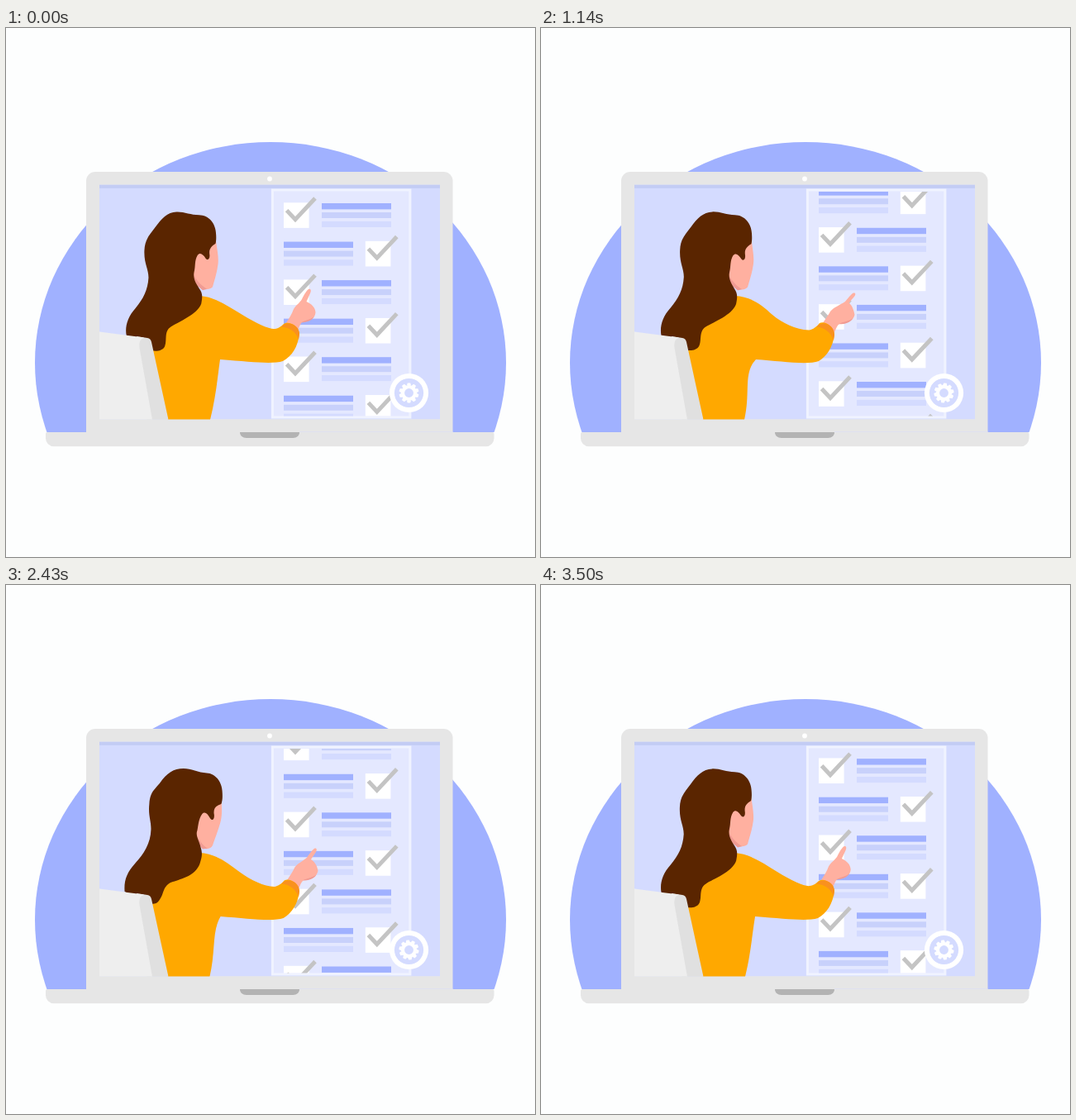
Recreate the animation shown at these times as an HTML page. Size 640 by 640 pixels, loop 3570 ms.

```html
<!DOCTYPE html>
<html lang="en">
<head>
<meta charset="utf-8">
<title>Online checklist</title>
<style>
  html, body { margin: 0; width: 100%; height: 100%; overflow: hidden; background: #fdfefe; }
  svg { display: block; width: 100%; height: 100%; }
</style>
</head>
<body>
<svg viewBox="0 0 640 640" xmlns="http://www.w3.org/2000/svg">
  <defs>
    <clipPath id="aboveBase"><rect width="640" height="489"/></clipPath>
    <clipPath id="screen"><rect x="113" y="189.5" width="412" height="284"/></clipPath>
    <clipPath id="page"><rect x="324" y="198" width="163" height="271.5"/></clipPath>
    <g id="bars">
      <rect width="84" height="7.4" fill="#a0b1ff"/>
      <rect y="11" width="84" height="7" fill="#c8d1fb"/>
      <rect y="21.8" width="84" height="7.2" fill="#d4dbff"/>
    </g>
    <g id="tick">
      <rect y="-.7" width="30.6" height="30.6" fill="#fff"/>
      <path d="M3.6 19.3 14.2 20.8 14.2 20.8" fill="none"/>
      <path d="M3.6 8.6 14 19.6 38-6" fill="none" stroke="#c4c4c4" stroke-width="5"/>
    </g>
    <g id="pair">
      <use href="#tick" x="336"/>
      <use href="#bars" x="382"/>
      <use href="#bars" x="336" y="46.55"/>
      <use href="#tick" x="434.8" y="46.55"/>
    </g>
  </defs>

  <ellipse cx="320" cy="405" rx="285" ry="267" fill="#a0b1ff" clip-path="url(#aboveBase)"/>
  <path d="M97 489V185a11 11 0 0 1 11-11H529.5a11 11 0 0 1 11 11V489Z" fill="#e6e6e6"/>
  <path d="M355 488.6H540.5" stroke="#dcdff4" stroke-width=".8"/>
  <path d="M50 489H588.5a2 2 0 0 1 2 2V496a10 10 0 0 1-10 10.3H58a10 10 0 0 1-10-10.3V491a2 2 0 0 1 2-2Z" fill="#e6e6e6"/>
  <path d="M283 489H355C355 493 352 496 347 496H291C286 496 283 493 283 489Z" fill="#b3b3b3"/>
  <circle cx="319" cy="182.5" r="2.9" fill="#fff"/>

  <g clip-path="url(#screen)">
    <rect x="113" y="189.5" width="412" height="284" fill="#d4dbff"/>
    <rect x="113" y="189.5" width="412" height="4.3" fill="#c3ccf4"/>
    <rect x="322.4" y="196" width="166.5" height="275" fill="#e4e8ff" stroke="#f0f3ff" stroke-width="3"/>
    <g clip-path="url(#page)"><g id="list"></g></g>

    <path id="face" fill="#ffb0a0"/>
    <path id="neck" fill="#f09b93"/>
    <path id="hand" fill="#ffb0a0"/>
    <path id="palm" fill="#f09b93"/>
    <path id="shirt" fill="#ffa800"/>
    <path id="cuff" fill="#f9911e"/>
    <path id="hair" fill="#5a2500"/>

    <path d="M158 373 171 375Q175 375.6 176 380L196.5 474H170Z" fill="#e0e0e0"/>
    <path d="M113 367.4 167 374.6Q160 377 161.5 387L177 474H113Z" fill="#eee"/>
  </g>

  <g transform="translate(487.5 441.5)">
    <circle r="23.6" fill="#fff"/>
    <circle r="17.6" fill="#d4dbff"/>
    <g id="gear" fill="#fff"><circle r="9.6"/></g>
    <circle r="5.4" fill="#d4dbff"/>
  </g>
</svg>

<script>
const LOOP = 3570, STEPS = 50, PAIR = 93.1, TEETH = 10;
const NS = 'http://www.w3.org/2000/svg';
const get = id => document.getElementById(id);

function add(parent, tag, attrs) {
  const el = document.createElementNS(NS, tag);
  for (const key in attrs) el.setAttribute(key, attrs[key]);
  parent.append(el);
}

for (let i = -1; i < 3; i++) add(get('list'), 'use', { href: '#pair', y: 212 + i * PAIR });
for (let i = 0; i < TEETH; i++) {
  add(get('gear'), 'path', {
    d: 'M-2.6-9-1.7-12H1.7L2.6-9Z',
    transform: `rotate(${i * 360 / TEETH})`
  });
}

// Each part has two end poses with the same path commands.
const headParts = {
  hair: [
    `M205 222.5C214 222 222 226 232 226C244 226 253 236 253 250C253.3 254 253 258 252.5 260
     C247 264 244.5 267 245.5 274C246 279 243 281.5 240.5 278C238 274 234 270.5 231 274.5
     C227 281 229 288 227 295C225.5 304 230 310 233 314C238 320 238 324 236.5 333
     C232 346 207 356 199 362C191 368 196 378 193 386C190 392 182 392 176 391L146 372
     C144 362 147 350 157 339C166 328 171 318 172 303C172 292 166 286 166.5 270
     C167 256 173 251 180 241C187 231 194 223 205 222.5Z`,
    `M215 222C224 222 233 227 243 227.5C254 228 262 239 262 252C262.3 257 262 262 260.5 265
     C254 267 250.5 271 252 278C252.5 284 249.5 286 247 282C244 277 241 273.5 237.5 277
     C233 283 233 290 231.5 297C229 303 234 310 235.5 317C238 325 237 329 234.5 337
     C229 352 213 355 202 359C189 363 191 375 186 380C183 385 180 386 174 385.5L143.5 371
     C142.5 358 146 348 156 337C167 325 175 312 175.5 296C176 286 172 279 173.5 265
     C174 252 179 248 186 240C195 227 203 222 215 222Z`
  ],
  face: [
    'M252 250C254 266 257 276 256 286C255 296 252 305 250 313C246 316.5 240 316 236 315L222 300L226 270Z',
    'M261 258C261 268 262 276 260 285C258 294 253 306 250 315C248 319.5 242 320 237 318.5L226 303L232 270Z'
  ],
  neck: [
    'M226 298C231 306 236 311 243 315.3L238 317L228 309Z',
    'M229 300C233 309 238 315 244 318.7L238 319.5L231 311Z'
  ]
};

const armParts = {
  shirt: [
    `M234 324C252 325 268 336 286 347C304 358 320 365 325 364C330 363.5 334 360 336 358
     C342 354 354 360 355 370C353 386 346 397 335 403C322 407 298 404 259 401
     C256 422 254 446 247 474L196 474L176 388L190 350Z`,
    `M234 324C254 325 266 334 280 347C292 357 308 365 324 365.5C329 365 334 361 337 357
     C343 354 354 360 355 371C353 386 346 397 336 403C322 408 290 403 260 401
     C244 418 254 440 246 474L196 474L176 388L190 350Z`
  ],
  cuff: [
    'M333 361.5C340 353 355 359 355 370L354 377C351 367 342 362 333 361.5Z',
    'M333.5 361.5C341 353 355 359 355 371L354 378C351 368 342 362 333.5 361.5Z'
  ],
  hand: [
    `M337 360C342 352 346 346 348 340C351 335 356 332 358 328C361 322 364 317 366 316
     C369 315 369.5 318 368 321L363.5 331C370 334 374 338 374.5 344C374 350 370 354 358 356
     C356 358 355 361 353 366Z`,
    `M339 360C344 352 348 347 350 343C354 338 362 335 368 331C372 326 376 321.5 378 320.5
     C381 320 381 322.5 379 325L372.5 332.5C377 336 378.5 342 379.5 347C378 354 370 358 361 358
     C358 360 357 364 355 368Z`
  ],
  palm: [
    'M357 356.5C363 352.5 369 353 373 349C370 354 364 356 357 356.5Z',
    'M360 358.3C367 354.5 373 355 377.5 351C374 357 367 358.5 360 358.3Z'
  ]
};

function blend([a, b], k) {
  const ends = b.match(/-?[\d.]+/g);
  let i = 0;
  return a.replace(/-?[\d.]+/g, n => (+n + (ends[i++] - n) * k).toFixed(2));
}

function pose(parts, k) {
  for (const id in parts) get(id).setAttribute('d', blend(parts[id], k));
}

const ease = u => (1 - Math.cos(Math.PI * u)) / 2;

// The head leans forward slowly and returns faster.
function lean(p) {
  const q = p < .1 ? p + 1 : p;
  if (q < .12) return 0;
  if (q < .74) return ease((q - .12) / .62);
  return 1 - ease(Math.min(1, (q - .74) / .34));
}

// The arm reaches out quickly and drifts back.
function reach(p) {
  return p < .34 ? 1 - (1 - p / .34) ** 2 : 1 - ((p - .34) / .66) ** 1.4;
}

function draw(ms) {
  const step = Math.floor((ms % LOOP) / LOOP * STEPS + .1) % STEPS;
  const p = step / STEPS;
  get('list').setAttribute('transform', `translate(0 ${p * PAIR})`);
  get('gear').setAttribute('transform', `rotate(${p * 360})`);
  pose(headParts, lean(p));
  pose(armParts, reach(p));
}

const start = performance.now();
function tick(now) {
  draw(Math.max(0, now - start));
  requestAnimationFrame(tick);
}
tick(start);
</script>
</body>
</html>
```
